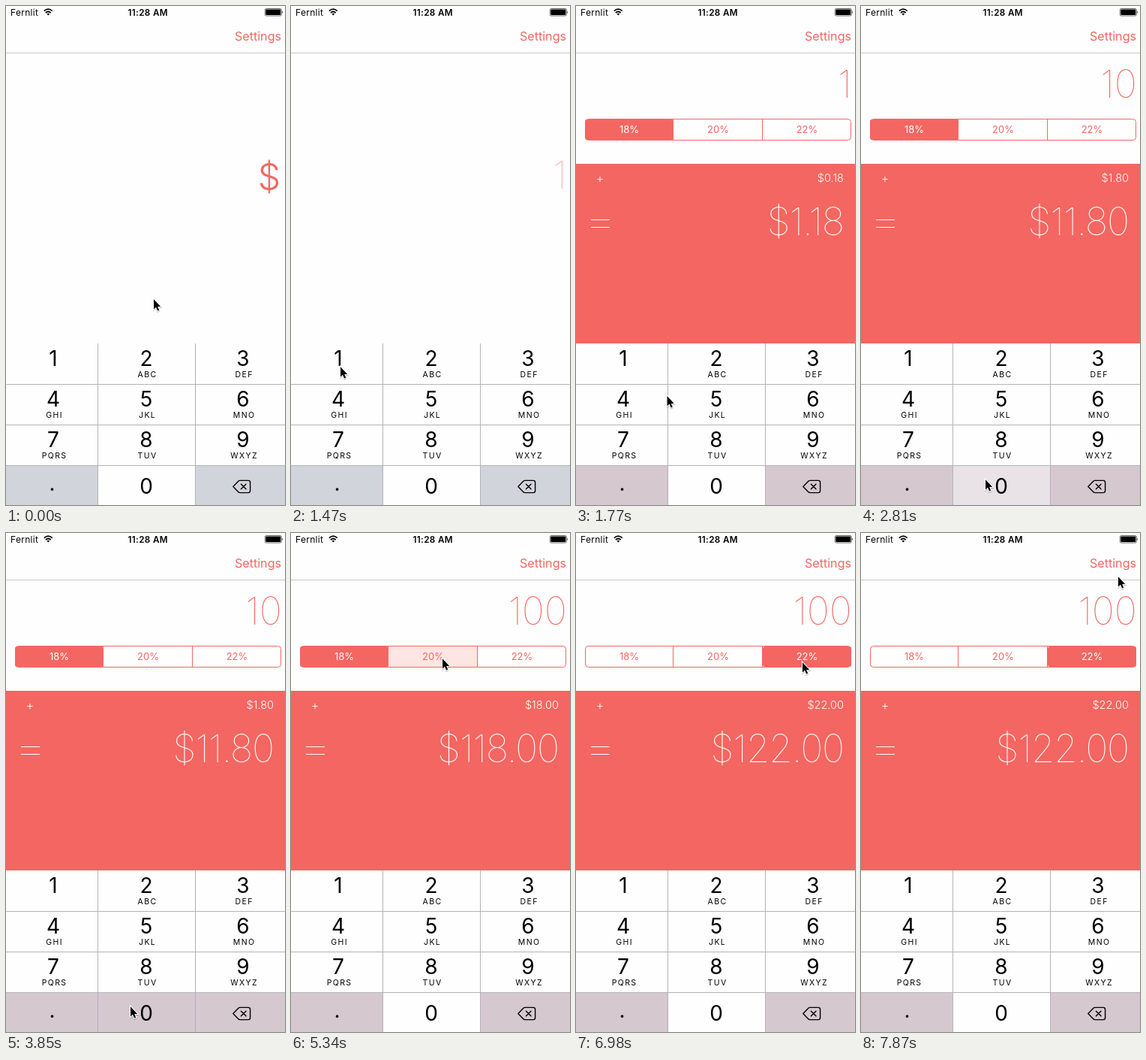
An HTML page that plays this animation: 372x664 px, repeating every 8 s.

```html
<!DOCTYPE html>
<html lang="en">
<head>
<meta charset="utf-8">
<title>Tip calculator</title>
<style>
  html, body { margin: 0; width: 100%; height: 100%; overflow: hidden; background: #fefefe; }
  svg { display: block; width: 100%; height: 100%; font-family: Inter, Roboto, sans-serif; --red: #f46661; }
  .red { fill: var(--red); }
  .white { fill: #fff; }
  .mid { text-anchor: middle; }
  .end { text-anchor: end; }
  .big { font-size: 51px; font-weight: 100; }
  .digit { font-size: 28px; }
  .letters { font-size: 10.5px; letter-spacing: 1.4px; }
  .percent { font-size: 13px; }
  .small { font-size: 14.5px; font-weight: 300; }
</style>
</head>
<body>
<svg viewBox="0 0 372 664">
  <rect width="372" height="664" fill="#fefefe"/>

  <!-- Status and navigation bars -->
  <text x="6" y="12.5" font-size="12" letter-spacing=".3">Fernlit</text>
  <g fill="none" stroke="#000" stroke-width="1.7">
    <path d="M50.8 6.6Q56.3 1.8 61.8 6.6M52.9 9Q56.3 6 59.7 9"/>
    <path d="M56.3 12.6L54.4 10.6Q56.3 9 58.2 10.6Z" fill="#000" stroke="none"/>
  </g>
  <text x="189.2" y="12.5" class="mid" font-size="11.7" font-weight="600" letter-spacing=".35">11:28 AM</text>
  <rect x="345.3" y="3.5" width="22" height="9.6" rx="1.8" fill="none" stroke="#000" stroke-width=".6"/>
  <rect x="346.3" y="4.5" width="20" height="7.6" rx="1"/>
  <path d="M368.3 6.6q1.6 1.7 0 3.4z"/>
  <text x="367" y="46" class="red end" font-size="16.1">Settings</text>
  <path d="M0 62.5H372" stroke="#c9c9c9"/>

  <text id="placeholder" x="366" y="243.5" class="red end" font-size="48" font-weight="300">$</text>
  <text id="amount" x="367.5" class="red end big" letter-spacing="-.3"></text>

  <g id="results">
    <g id="segments"></g>
    <rect x="12.5" y="150.5" width="354" height="28" rx="4" fill="none" stroke="var(--red)"/>
    <rect y="210" width="372" height="239" class="red"/>
    <text x="32" y="235" class="white mid" font-size="16" font-weight="300">+</text>
    <text id="tip" x="357" y="234" class="white end small"></text>
    <path d="M20 284.5H45M20 294.5H45" stroke="#fff"/>
    <text id="total" x="357" y="304.5" class="white end big" letter-spacing="-1.2"></text>
  </g>

  <!-- Keypad -->
  <rect y="449" width="372" height="215" fill="#fefefe"/>
  <path id="sideKeys" d="M0 612H122V664H0zM253 612H372V664H253z"/>
  <g id="pressed"></g>
  <path d="M0 503.5H372M0 557.5H372M0 611.5H372M122.5 449V664M252.5 449V664" stroke="#b4b4b8"/>
  <g id="keys"></g>
  <g fill="none" stroke="#000" stroke-width="1.4" stroke-linejoin="round" stroke-linecap="round">
    <path d="M302.8 639.5L309.6 632.4Q310.6 631.4 312 631.4H323Q325.6 631.4 325.6 634V645Q325.6 647.6 323 647.6H312Q310.6 647.6 309.6 646.6Z"/>
    <path d="M313.4 636.2L320 642.8M320 636.2L313.4 642.8"/>
  </g>

  <g id="cursor">
    <path id="arrow" d="M0 0V13.2L3 10.5L5.1 15.4L7.2 14.5L5.2 9.8H9.2Z" stroke="#fff" stroke-width="2" paint-order="stroke"
      style="filter: drop-shadow(.5px 1px .6px #0004)"/>
  </g>
</svg>
<script>
const LOOP = 8000, TICK = 148.5, LEAD = 18; // the screen updates once per tick
const RATES = [18, 20, 22];
const LETTERS = ['', 'ABC', 'DEF', 'GHI', 'JKL', 'MNO', 'PQRS', 'TUV', 'WXYZ'];
const COLUMN_CENTERS = [63, 187, 316];

const CURSOR_START = { x: 196, y: 389 };
const GLIDES = [
  { from: 1, to: 6, x: 65, y: 479 },
  { from: 10, to: 16, x: 165, y: 629 },
  { from: 30, to: 35, x: 201, y: 166 },
  { from: 39, to: 43, x: 301, y: 171 },
  { from: 50, to: 53, x: 342, y: 57 }
];
const KEY_TAPS = [{ tick: 8, digit: 1 }, { tick: 18, digit: 0 }, { tick: 26, digit: 0 }];
const RATE_TAPS = [{ tick: 36, index: 1 }, { tick: 46, index: 2 }];

const $ = id => document.getElementById(id);
const clamp = v => Math.max(0, Math.min(1, v));
const easeOut = k => 1 - (1 - k) ** 2;
const smooth = k => k * k * (3 - 2 * k);
const money = v => '$' + v.toFixed(2);
const label = (x, y, cls, text) => `<text x="${x}" y="${y}" class="${cls}">${text}</text>`;
const segmentEdge = i => Math.round(12 + 118.3 * i);

$('keys').innerHTML = LETTERS.map((letters, i) => {
  const x = COLUMN_CENTERS[i % 3], y = 479 + 54 * Math.floor(i / 3);
  return label(x, y, 'mid digit', i + 1) + label(x + 1.6, y + 15, 'mid letters', letters);
}).join('') + label(61.5, 645, 'mid digit', '.') + label(187, 648.5, 'mid digit', 0);

$('pressed').innerHTML = KEY_TAPS.map(({ digit }) => {
  const cell = digit ? digit - 1 : 10;
  return `<rect x="${130 * (cell % 3) - 7}" y="${450 + 54 * Math.floor(cell / 3)}" width="129" height="53"/>`;
}).join('');

$('segments').innerHTML = RATES.map((rate, i) => {
  const left = segmentEdge(i), right = segmentEdge(i + 1);
  return `<g><rect x="${left}" y="151" width="${right - left}" height="27" rx="${i === 1 ? 0 : 3}" class="red"/>
    ${label((left + right) / 2, 169, 'mid percent', rate + '%')}
    ${i ? `<path d="M${left - .5} 151v27" stroke="var(--red)"/>` : ''}</g>`;
}).join('');

function cursorAt(tick) {
  let { x, y } = CURSOR_START;
  for (const glide of GLIDES) {
    const k = clamp((tick - glide.from) / (glide.to - glide.from));
    x += (glide.x - x) * easeOut(k);
    y += (glide.y - y) * smooth(k);
  }
  return { x, y };
}

function draw(ms) {
  const tick = Math.floor((ms % LOOP + LEAD) / TICK);
  const typed = KEY_TAPS.filter(tap => tick > tap.tick).map(tap => tap.digit).join('');
  const selected = RATE_TAPS.findLast(tap => tick > tap.tick)?.index ?? 0;
  const touched = RATE_TAPS.find(tap => tick === tap.tick)?.index;
  const reveal = clamp((tick - 10) / 2);

  $('placeholder').style.opacity = typed ? 0 : 1;
  $('amount').textContent = typed;
  $('amount').setAttribute('y', 243 - 121.5 * reveal);
  $('amount').style.opacity = clamp((tick - 8) / 4);

  const bill = Number(typed), tip = bill * RATES[selected] / 100;
  $('results').style.opacity = reveal;
  $('tip').textContent = money(tip);
  $('total').textContent = money(bill + tip);
  [...$('segments').children].forEach(({ children: [fill, text] }, i) => {
    fill.style.opacity = i === selected ? 1 : i === touched ? .16 : 0;
    text.style.fill = i === selected ? '#fff' : 'var(--red)';
  });

  // The translucent keys pick up the red panel behind them
  const mix = (a, b) => a + (b - a) * reveal;
  const keyColor = `rgb(${mix(209, 214)},${mix(212, 200)},${mix(219, 207)})`;
  $('sideKeys').style.fill = $('pressed').style.fill = keyColor;
  KEY_TAPS.forEach((tap, i) => {
    const age = tick - tap.tick;
    $('pressed').children[i].style.opacity = age < 0 ? 0 : clamp(1 - age / 2);
  });

  const { x, y } = cursorAt(tick);
  $('cursor').setAttribute('transform', `translate(${x + 1} ${y + 1.2})`);
}

const begin = performance.now();
function loop() {
  draw(performance.now() - begin);
  requestAnimationFrame(loop);
}
loop();
</script>
</body>
</html>
```
